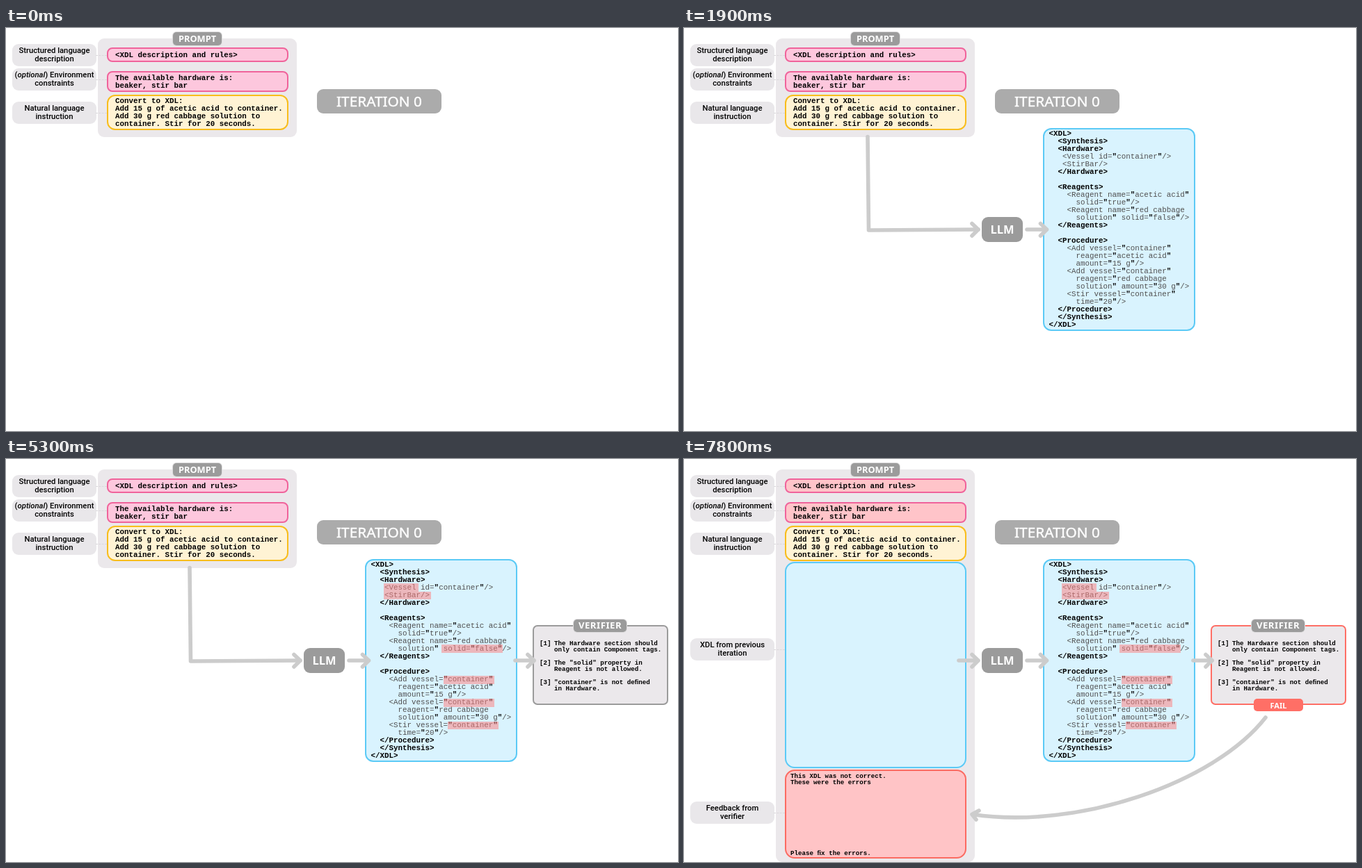
Write an HTML page that moves like this. It is 966 by 580 pixels and loops after 8000 ms.

```html
<!DOCTYPE html>
<html lang="en">
<head>
<meta charset="utf-8">
<title>Prompt, LLM and verifier loop</title>
<style>
html, body { margin: 0; width: 100%; height: 100%; overflow: hidden; background: #fff; }
#stage { position: relative; width: 966px; height: 580px; overflow: hidden; }
#stage div, pre, svg { position: absolute; box-sizing: border-box; margin: 0; }
svg { left: 0; top: 0; }

.label {
  left: 9px; width: 121px; height: 32px; border-radius: 9px; background: #e9e7ea;
  display: flex; align-items: center; justify-content: center; text-align: center;
  font: 500 11.25px/12.5px Roboto, sans-serif; color: #000; white-space: pre;
}
.label::after {
  content: ""; position: absolute; left: 120px; top: 16px; width: 16px;
  border-top: 1px dashed #dad8db;
}
.tag {
  display: flex; align-items: center; justify-content: center; color: #fff;
  background: #9b9b9b; border-radius: 5px; font: 700 12.8px/1 "Noto Sans", sans-serif;
}
.panel { background: #ebe8eb; }
.box { border: 2px solid; left: 145px; width: 261px; border-radius: 12px; }
.pink { background: #fdc7dd; border-color: #f0639b; border-radius: 8px; }
.yellow { background: #fff3d4; border-color: #f8bd1c; }
.blue { background: #d9f3fe; border-color: #5bcaf6; border-radius: 14px; }
.red { background: #ffc4c6; border: 2.5px solid #fb6b62; border-radius: 14px; }
pre { font: 700 10.85px/11px "Liberation Mono", "Courier New", monospace; color: #000; }
.code { font-weight: 400; color: #505050; }
.code q { quotes: '"' '"'; }
.code q::before, .code q::after, .code b { font-weight: 700; color: #000; }
.small { font-size: 9.2px; line-height: 9.3px; }
.mark { height: 12px; background: rgba(255, 129, 128, .52); }
.arrow path { fill: none; stroke: #ccc; stroke-width: 5.6; stroke-linejoin: round; stroke-linecap: round; }
.arrow .shaft { stroke-dasharray: 1 2; }

/* every change is a hard step on one 8 s clock */
.ani { animation: 8s step-end infinite; }
@keyframes s1100 { 0% { visibility: hidden } 13.75% { visibility: visible } 86.25% { visibility: hidden } }
@keyframes s1200 { 0% { visibility: hidden } 15% { visibility: visible } }
@keyframes s1800 { 0% { visibility: hidden } 22.5% { visibility: visible } }
@keyframes s1900 { 0% { visibility: hidden } 23.75% { visibility: visible } }
@keyframes s2500 { 0% { visibility: hidden } 31.25% { visibility: visible } }
@keyframes s2600 { 0% { visibility: hidden } 32.5% { visibility: visible } }
@keyframes s3100 { 0% { visibility: hidden } 38.75% { visibility: visible } }
@keyframes s4200 { 0% { visibility: hidden } 52.5% { visibility: visible } }
@keyframes s5300 { 0% { visibility: hidden } 66.25% { visibility: visible } }
@keyframes s6400 { 0% { visibility: hidden } 80% { visibility: visible } }
@keyframes s6900 { 0% { visibility: hidden } 86.25% { visibility: visible } }
@keyframes s7700 { 0% { visibility: hidden } 96.25% { visibility: visible } }
@keyframes s7800 { 0% { visibility: hidden } 97.5% { visibility: visible } }
@keyframes grow { 0% { height: 142px } 86.25% { height: 565px } }
@keyframes tint { 0% { background: #fdc7dd } 86.25% { background: #ffc4c9 } }
@keyframes fail { 0% { border-color: #9b9b9b } 80% { border-color: #ff6f66 } }
@keyframes drawLong {
  0% { visibility: hidden; stroke-dashoffset: 1 }
  7.5% { visibility: visible; stroke-dashoffset: .8333; animation-timing-function: steps(5) }
  13.75% { visibility: visible; stroke-dashoffset: 0 }
  86.25% { visibility: hidden; stroke-dashoffset: 0 }
}
@keyframes drawOut {
  0% { visibility: hidden; stroke-dashoffset: 1 }
  21.25% { visibility: visible; stroke-dashoffset: .5 }
  22.5%, 100% { visibility: visible; stroke-dashoffset: 0 }
}
@keyframes drawCheck {
  0% { visibility: hidden; stroke-dashoffset: 1 }
  30% { visibility: visible; stroke-dashoffset: .5 }
  31.25%, 100% { visibility: visible; stroke-dashoffset: 0 }
}
@keyframes drawBack {
  0% { visibility: hidden; stroke-dashoffset: 1 }
  92.5% { visibility: visible; stroke-dashoffset: .75; animation-timing-function: steps(3) }
  96.25%, 100% { visibility: visible; stroke-dashoffset: 0 }
}
</style>
</head>
<body>
<div id="stage">
  <!-- prompt -->
  <div class="panel ani" style="left:132px;top:15px;width:286px;border-radius:9px;animation-name:grow"></div>
  <div class="label" style="top:23px">Structured language
description</div>
  <div class="label" style="top:58px"><span>(<i>optional</i>) Environment
constraints</span></div>
  <div class="label" style="top:106px">Natural language
instruction</div>
  <div class="label ani" style="top:258px;animation-name:s6900">XDL from previous
iteration</div>
  <div class="label ani" style="top:493px;animation-name:s6900">Feedback from
verifier</div>
  <div class="tag" style="left:240px;top:6px;width:70px;height:19px;box-shadow:0 0 0 1px #dddcdd">PROMPT</div>

  <div class="box pink ani" style="top:28px;height:21px;animation-name:tint"></div>
  <div class="box pink ani" style="top:62px;height:30px;animation-name:tint"></div>
  <div class="box yellow" style="top:96px;height:51px"></div>
  <div class="box blue ani" style="top:148px;height:297px;animation-name:s6900"></div>
  <div class="box red ani" style="top:447px;height:128px;animation-name:s6900"></div>
  <pre style="left:157px;top:33.5px">&lt;XDL description and rules&gt;</pre>
  <pre style="left:157px;top:66.5px">The available hardware is:
beaker, stir bar</pre>
  <pre style="left:157px;top:99.5px">Convert to XDL:
Add 15 g of acetic acid to container.
Add 30 g red cabbage solution to
container. Stir for 20 seconds.</pre>
  <pre class="small ani" style="left:153px;top:451.5px;animation-name:s7800">This XDL was not correct.
These were the errors</pre>
  <pre class="small ani" style="left:153px;top:563px;animation-name:s7800">Please ﬁx the errors.</pre>

  <div class="tag" style="left:447px;top:88px;width:179px;height:35px;border-radius:9px;background:#ababab;font-size:20.8px;font-weight:400;-webkit-text-stroke:.4px #fff">ITERATION 0</div>
  <div class="tag ani" style="left:428px;top:272px;width:59px;height:36px;border-radius:9px;font-size:16.5px;animation-name:s1200">LLM</div>

  <!-- generated XDL -->
  <div class="ani" style="left:0;top:0;animation-name:s1900">
    <div class="box blue" style="left:516px;top:144px;width:219px;height:292px;border-radius:12px"></div>
    <pre class="code" style="left:524.5px;top:147px"><b>&lt;XDL&gt;
  &lt;Synthesis&gt;
  &lt;Hardware&gt;</b>
   &lt;Vessel id=<q>container</q>/&gt;
   &lt;StirBar/&gt;
<b>  &lt;/Hardware&gt;

  &lt;Reagents&gt;</b>
    &lt;Reagent name=<q>acetic acid</q>
      solid=<q>true</q>/&gt;
    &lt;Reagent name=<q>red cabbage
      solution</q> solid=<q>false</q>/&gt;
<b>  &lt;/Reagents&gt;

  &lt;Procedure&gt;</b>
    &lt;Add vessel=<q>container</q>
      reagent=<q>acetic acid</q>
      amount=<q>15 g</q>/&gt;
    &lt;Add vessel=<q>container</q>
      reagent=<q>red cabbage
      solution</q> amount=<q>30 g</q>/&gt;
    &lt;Stir vessel=<q>container</q>
      time=<q>20</q>/&gt;
<b>  &lt;/Procedure&gt;
  &lt;/Synthesis&gt;
&lt;/XDL&gt;</b></pre>
  </div>

  <!-- verifier -->
  <div class="panel ani" style="left:757px;top:239px;width:195px;height:115px;border:2px solid #9b9b9b;border-radius:7px;animation-name:s2600,fail"></div>
  <div class="tag ani" style="left:816px;top:231px;width:76px;height:18px;box-shadow:0 0 0 1px #dddcdd;font-size:13.2px;letter-spacing:.5px;animation-name:s2600">VERIFIER</div>
  <div class="tag ani" style="left:819px;top:345px;width:71px;height:18px;background:#ff6f66;font-size:11px;animation-name:s6400">FAIL</div>

  <div class="ani" style="left:0;top:0;animation-name:s3100">
    <div class="mark" style="left:543px;top:179px;width:50px"></div>
    <div class="mark" style="left:543px;top:191px;width:68px;height:11px"></div>
    <pre class="small" style="left:767px;top:261px">[1]</pre>
    <pre class="small" style="left:788px;top:261px">The Hardware section should
only contain Component tags.</pre>
  </div>
  <div class="ani" style="left:0;top:0;animation-name:s4200">
    <div class="mark" style="left:626px;top:267px;width:88px"></div>
    <pre class="small" style="left:767px;top:289px">[2]</pre>
    <pre class="small" style="left:788px;top:289px">The "solid" property in
Reagent is not allowed.</pre>
  </div>
  <div class="ani" style="left:0;top:0;animation-name:s5300">
    <div class="mark" style="left:629px;top:312px;width:73px"></div>
    <div class="mark" style="left:629px;top:345px;width:73px"></div>
    <div class="mark" style="left:635px;top:378px;width:73px;height:11px"></div>
    <pre class="small" style="left:767px;top:317px">[3]</pre>
    <pre class="small" style="left:788px;top:317px">"container" is not deﬁned
in Hardware.</pre>
  </div>

  <svg class="arrow" width="966" height="580" viewBox="0 0 966 580">
    <path class="shaft ani" pathLength="1" style="animation-name:drawLong" d="M264 156.5L265.5 291L423 290"/>
    <path class="ani" style="animation-name:s1100" d="M414 281.5L423 290L414 299"/>
    <path class="ani" style="animation-name:s6900" d="M395 290H423M414 281.5L423 290L414 299"/>
    <path class="shaft ani" pathLength="1" style="animation-name:drawOut" d="M493 290H521"/>
    <path class="ani" style="animation-name:s1800" d="M512.5 281.5L521.5 290L512.5 299"/>
    <path class="shaft ani" pathLength="1" style="animation-name:drawCheck" d="M732 290H759"/>
    <path class="ani" style="animation-name:s2500" d="M750 281.5L759 290L750 299"/>
    <path class="shaft ani" pathLength="1" style="animation-name:drawBack" d="M836 372C762 467 564 534 415 511.5"/>
    <path class="ani" style="animation-name:s7700" d="M424 506L414 511.5L420 519"/>
  </svg>
</div>
</body>
</html>
```
